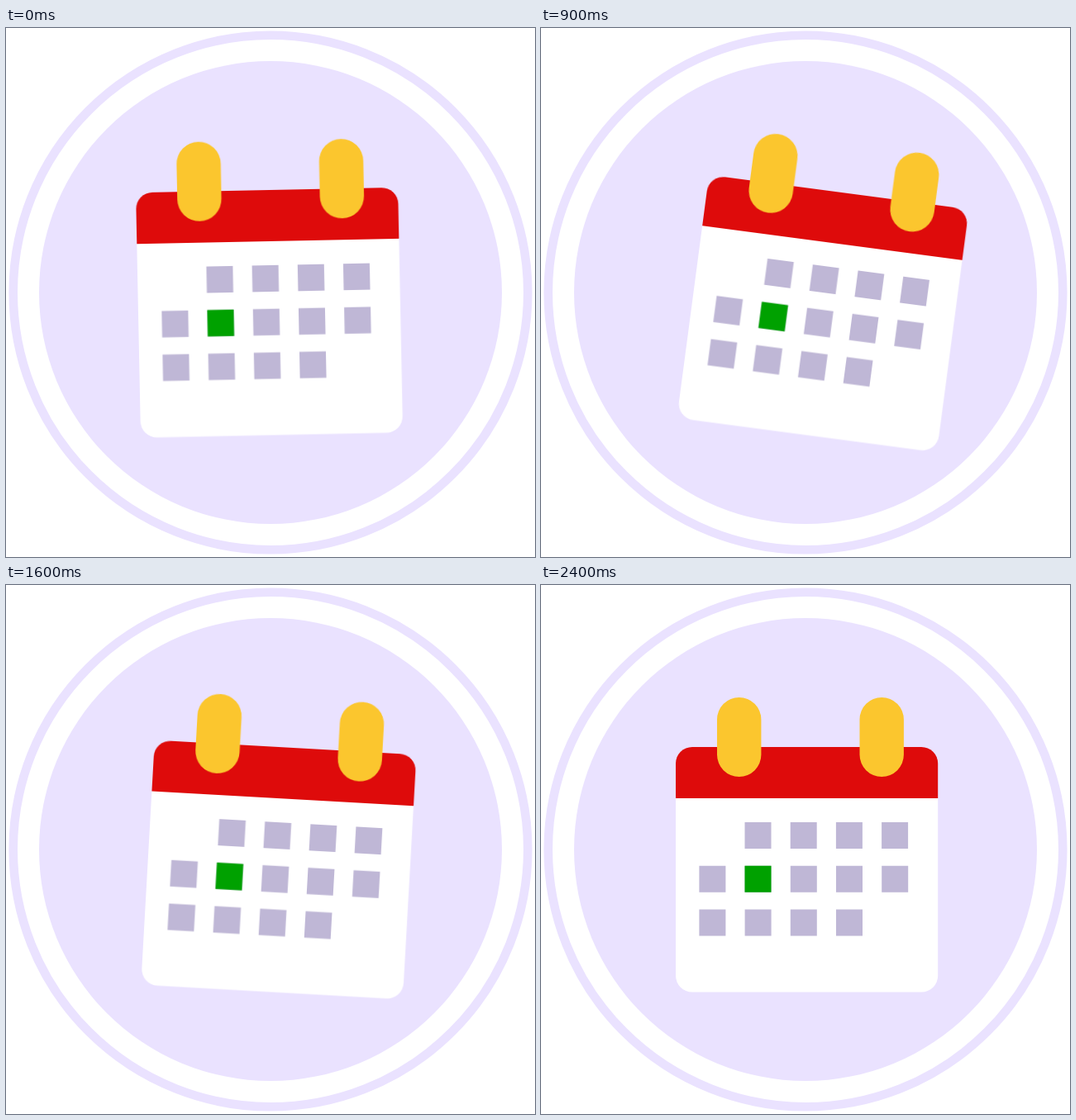
These frames come from a looping animation (640 by 640 pixels, 4800 ms). An HTML page without scripts:

```html
<!DOCTYPE html>
<html lang="en">
<head>
<meta charset="utf-8">
<title>Swinging calendar</title>
<style>
  html, body { margin: 0; width: 100%; height: 100%; overflow: hidden; background: #fff; }
  svg { display: block; width: 100vw; height: 100vh; }
  .disc { fill: #eae2ff; }
  .ring { fill: none; stroke: #eae2ff; stroke-width: 10.6; }
  .paper { fill: #fff; }
  .header { fill: #de0b0b; }
  .clip { stroke: #fbc62e; stroke-width: 53.4; stroke-linecap: round; }
  .days { fill: none; stroke: #bfb7d6; stroke-width: 32; stroke-dasharray: 32 23.2; }
  .today { fill: #00a100; }

  /* Sine-eased swing that dies away, then a rest */
  .calendar {
    transform-origin: 321.5px 492.5px;
    animation: swing 4.8s cubic-bezier(.37, 0, .63, 1) infinite;
  }
  @keyframes swing {
    0%       { transform: rotate(-1.12deg); animation-timing-function: cubic-bezier(.61, 1, .88, 1); animation-timing-function: cubic-bezier(.39, .575, .565, 1); }
    7.5%     { transform: rotate(-9.1deg); }
    16.67%   { transform: rotate(9.9deg); }
    24.58%   { transform: rotate(-4.6deg); }
    31.56%   { transform: rotate(4.1deg); }
    38.96%   { transform: rotate(-2.4deg); }
    45.6%    { transform: rotate(2.6deg); }
    50%, to  { transform: rotate(0deg); }
  }
</style>
</head>
<body>
<svg viewBox="0 0 640 640">
  <circle class="ring" cx="320" cy="320" r="311.3"/>
  <circle class="disc" cx="320" cy="320" r="280"/>

  <g class="calendar">
    <path class="paper" d="M163 257H480.2V472.5a20 20 0 0 1-20 20H183a20 20 0 0 1-20-20z"/>
    <path class="header" d="M163 258V216a20 20 0 0 1 20-20H460.2a20 20 0 0 1 20 20V258z"/>
    <path class="clip" d="M239.7 162.7v42.6M412.2 162.7v42.6"/>
    <!-- Each dash is one day -->
    <path class="days" d="M246.5 303H444.5M191.4 355.7H444.5M191.4 408.4H389.2"/>
    <rect class="today" x="246.5" y="339.7" width="32" height="32"/>
  </g>
</svg>
</body>
</html>
```
